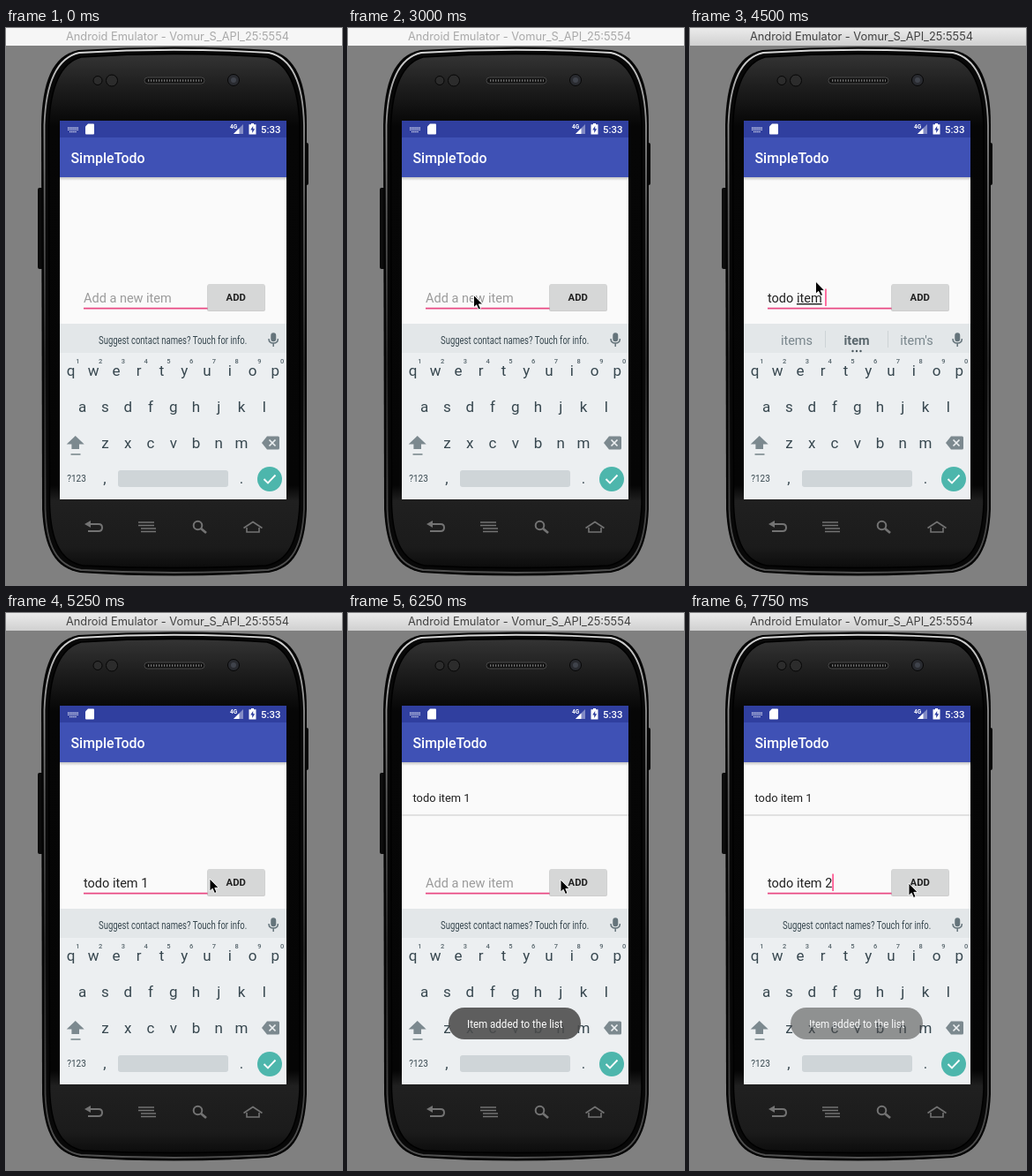
Write an HTML page that moves like this. It is 381x631 px and loops after 8000 ms.

```html
<!DOCTYPE html>
<html lang="en">
<head>
<meta charset="utf-8">
<title>Todo app demo</title>
<style>
  html, body { margin: 0; width: 100%; height: 100%; overflow: hidden; background: #808080; }
  svg { display: block; width: 381px; height: 631px; font-family: Roboto, sans-serif; }
  text { white-space: pre; }
  .mid { text-anchor: middle; }
  .medium { font-weight: 500; }
  #title { font: 12.8px Inter, sans-serif; }
  #keys { font-size: 17px; fill: #37474f; }
  #keys .hint { font-size: 7.5px; font-weight: 500; fill: #55646b; }
  #words { font-size: 14.5px; fill: #78858b; }
  #field { font-size: 14.5px; fill: #212121; }
  .composing { text-decoration: underline; text-decoration-thickness: 1px; }
</style>
</head>
<body>
<svg viewBox="0 0 381 631">
  <defs>
    <linearGradient id="bar" x2="0" y2="1">
      <stop stop-color="#ebebeb"/><stop offset="1" stop-color="#d0d0d0"/>
    </linearGradient>
    <linearGradient id="rim" x2="0" y2="1">
      <stop stop-color="#d8d8d8"/><stop offset=".08" stop-color="#a2a2a2"/>
      <stop offset=".3" stop-color="#5a5a5a"/><stop offset=".6" stop-color="#242424"/>
      <stop offset="1" stop-color="#505050"/>
    </linearGradient>
    <linearGradient id="face" x2="0" y2="1">
      <stop stop-color="#343434"/><stop offset=".06" stop-color="#1f1f1f"/>
      <stop offset=".14" stop-color="#060606"/><stop offset=".84" stop-color="#050505"/>
      <stop offset=".87" stop-color="#202020"/><stop offset=".96" stop-color="#1b1b1b"/>
      <stop offset="1" stop-color="#0c0c0c"/>
    </linearGradient>
    <linearGradient id="shade" x2="0" y2="1">
      <stop stop-opacity=".22"/><stop offset="1" stop-opacity="0"/>
    </linearGradient>
  </defs>

  <rect width="381" height="631" fill="#808080"/>
  <rect id="titleBar" width="381" height="20"/>
  <text id="title" class="mid" x="194.5" y="14">Android Emulator - Vomur_S_API_25:5554</text>

  <!-- phone -->
  <rect x="36" y="181" width="8" height="92" rx="2" fill="#0c0c0c"/>
  <rect x="337" y="130" width="6" height="48" rx="2" fill="#0c0c0c"/>
  <path d="M40 110C41 62 52 31 82 25Q190 18 299 25C329 31 341 62 341 110V545C339 590 326 612 298 617Q190 624 84 617C56 612 43 590 41 545Z" fill="#050505"/>
  <path d="M43.500 110C45 64 56 34 83 28Q190 21.500 298 28C325 34 337 64 338 110V545C336 588 324 609 297 614Q190 620 85 614C58 609 46 588 44.500 545Z" fill="#080808" stroke="url(#rim)" stroke-width="1.800"/>
  <path d="M48.500 112C50 70 60 40 85 33Q190 26 296 33C321 40 332 70 333 112V540C331 582 320 604 295 609Q190 614 87 609C62 604 51 582 49.500 540Z" fill="url(#face)" stroke="#000" stroke-width="1.500"/>
  <g stroke="#060606">
    <circle cx="104" cy="59.500" r="5" fill="#2c2c2c"/>
    <circle cx="120" cy="59.500" r="6.500" fill="#2c2c2c"/>
    <circle cx="258" cy="59" r="6.500" fill="#292b30"/>
  </g>
  <circle cx="258" cy="59" r="3" fill="#3f434b"/>
  <rect x="157" y="56" width="68" height="7" rx="3.500" fill="#111" stroke="#4a4a4a"/>
  <path d="M161 59.500H222" stroke="#777" stroke-width="2.500" stroke-dasharray="1.300 1.700"/>
  <g fill="none" stroke="#737373" stroke-width="2">
    <path d="M96 562h9q4 0 4 4t-4 4h-12"/>
    <path d="M96 558v8l-7-4z" fill="#737373" stroke="none"/>
    <path d="M150 560h18M150 563.500h18M153 567h17M153 570.500h17" stroke-width="1.500"/>
    <circle cx="217.500" cy="563.500" r="4.800"/><path d="M221 567l6 5" stroke-width="2.800"/>
    <path d="M269.500 566.500L280 559.500l10.500 7M273 566v5h14v-5" stroke-width="1.600"/>
  </g>

  <!-- app -->
  <rect x="61" y="105" width="257" height="429" fill="#fafafa"/>
  <rect x="61" y="124" width="257" height="45" fill="#3f51b5"/>
  <rect x="61" y="105" width="257" height="19" fill="#303f9f"/>
  <rect x="61" y="169" width="257" height="4" fill="url(#shade)"/>
  <g fill="#fff">
    <path d="M70 113.200h12M70 115.400h12M72 117.600h8" stroke="#d5d9ee" stroke-width="1.400" stroke-dasharray="1.400 .7"/>
    <path d="M93 108.500h6q1 0 1 1v10q0 1-1 1h-8q-1 0-1-1v-8z"/>
    <text x="254" y="114" font-size="6.500" font-weight="700">4G</text>
    <path d="M269 109v11h-11z" opacity=".4"/><path d="M264.500 113.500v6.500h-6.500z"/>
    <path d="M278 108h3v1.300h2.500v11.200h-8v-11.200h2.500z"/>
    <path d="M280.200 111l-3 4.500h2v3.500l3-4.700h-2z" fill="#303f9f"/>
    <text class="medium" x="289" y="119" font-size="11.400">5:33</text>
    <text class="medium" x="73.500" y="153" font-size="15.900">SimpleTodo</text>
  </g>
  <g id="item">
    <text x="73.500" y="214" font-size="12.850" fill="#212121">todo item 1</text>
    <path d="M61 229h257" stroke="#d8d8d8" stroke-width="1.300"/>
  </g>
  <path d="M88 317.700H229" stroke="#e94a84" stroke-width="1.700"/>
  <text x="88" y="311" font-size="14.500" fill="#9b9b9b" id="placeholder">Add a new item</text>
  <text x="88" y="311" id="field"></text>
  <rect id="caret" y="295.500" width="1.500" height="19.500" fill="#ff4081"/>
  <rect x="228" y="291" width="66" height="30" rx="2" fill="#000" opacity=".18"/>
  <rect id="button" x="228.500" y="290" width="65" height="30" rx="2"/>
  <text class="mid" x="260.700" y="309" font-size="11.300" font-weight="600" fill="#212121">ADD</text>

  <!-- keyboard -->
  <rect x="61" y="335" width="257" height="199" fill="#eceff1"/>
  <rect x="61" y="335" width="257" height="33" fill="#e3e7e9"/>
  <text id="notice" transform="translate(105 358) scale(.74 1)" font-size="12.850" fill="#37474f">Suggest contact names? Touch for info.</text>
  <g id="words" class="mid">
    <text x="121" y="359"></text>
    <text x="189" y="359" font-weight="700" fill="#5a676d"></text>
    <text x="257" y="359"></text>
    <path d="M153.500 343v19M224.500 343v19" stroke="#cdd3d6"/>
    <path d="M184.500 366h0M189 366h0M193.500 366h0" stroke="#4d5a60" stroke-width="2.400" stroke-linecap="round"/>
  </g>
  <g fill="none" stroke="#65747b" stroke-width="1.500">
    <rect x="301" y="346" width="4.500" height="8.500" rx="2.200" fill="#65747b"/>
    <path d="M298 352q0 5 5.200 5t5.200-5M303.200 357v4"/>
  </g>
  <g id="keys" class="mid">
    <text x="80" y="514" font-size="10">?123</text>
    <text x="112" y="516">,</text><text x="267" y="516">.</text>
  </g>
  <rect x="127" y="501" width="125" height="19" rx="3" fill="#cfd5d8"/>
  <path d="M78.700 462l10 9.500h-5.700v5.500h-8.600v-5.500h-5.700z" fill="#7c898f"/>
  <path d="M73.500 483h11" stroke="#7c898f" stroke-width="1.600"/>
  <path d="M296 462.500h12.500q1.500 0 1.500 1.500v12q0 1.500-1.500 1.500H296l-6-7.500z" fill="#7c898f"/>
  <path d="M298.500 466.500l7 7m0-7l-7 7" stroke="#eceff1" stroke-width="1.700"/>
  <circle cx="299" cy="511" r="14" fill="#4db6ac"/>
  <path d="M292.500 511l4.500 4.500 8.500-9" fill="none" stroke="#fff" stroke-width="1.900"/>

  <g id="toast">
    <rect x="114" y="447" width="150" height="36" rx="18" fill="#4a4a4a" opacity=".88"/>
    <text transform="translate(135 470) scale(.9 1)" font-size="12.850" fill="#fff">Item added to the list</text>
  </g>
  <path id="mouse" d="M0 0V14.200L3.200 11.300 5.500 16.500 8 15.400 5.800 10.400H10.200Z" fill="#000" stroke="#fff" stroke-width=".9"/>
</svg>

<script>
const $ = id => document.getElementById(id);
const NS = "http://www.w3.org/2000/svg";
const LOOP = 8000;

function addText(parent, x, y, content, className = "") {
  const node = document.createElementNS(NS, "text");
  node.setAttribute("x", x);
  node.setAttribute("y", y);
  node.setAttribute("class", className);
  node.textContent = content;
  parent.append(node);
}

[["qwertyuiop", 73.5, 394], ["asdfghjkl", 86.7, 435], ["zxcvbnm", 112.5, 476]].forEach(([row, left, y], r) => {
  [...row].forEach((letter, i) => {
    const x = left + 25.75 * i;
    addText($("keys"), x, y, letter);
    if (r === 0) addText($("keys"), x + 8, 380, (i + 1) % 10, "hint");
  });
});

// Each step lists only what changes; underscores enclose composing text.
const steps = [
  [0, { active: false, text: "", caret: false, words: null, mouse: null, item: false, toast: 0, pressed: false }],
  [250, { caret: true }],
  [750, { caret: false, mouse: [161, 265] }],
  [1000, { mouse: [148, 290] }],
  [1250, { caret: true, mouse: [142.5, 302.5] }],
  [1750, { caret: false }],
  [2250, { caret: true }],
  [2750, { caret: false }],
  [3250, { active: true, caret: true, mouse: [142.5, 295] }],
  [3500, { text: "t", mouse: [142.5, 287] }],
  [3750, { text: "tod", words: ["go", "to", "two"] }],
  [4000, { text: "todo ", words: ["to do", "todo", "today"] }],
  [4250, { text: "todo _it_", words: ["its", "it", "it's"] }],
  [4500, { text: "todo _item_ ", words: ["items", "item", "item's"] }],
  [4750, { text: "todo item 1", words: null, mouse: [180, 294] }],
  [5000, { mouse: [231, 301] }],
  [5250, { caret: false }],
  [5500, { pressed: true, mouse: [241, 302] }],
  [5750, { text: "", caret: true, item: true, toast: .63 }],
  [6000, { toast: 1, pressed: false }],
  [6250, { caret: false }],
  [6750, { text: "t", caret: true }],
  [7000, { text: "todo ", words: ["to do", "todo", "today"] }],
  [7250, { text: "todo _item_ ", words: ["items", "item", "item's"] }],
  [7500, { text: "todo item 2", words: null }],
  [7750, { toast: .65, mouse: [248, 306] }]
];

const show = (id, on) => { $(id).style.display = on ? "" : "none"; };

function setField(text) {
  $("field").replaceChildren(...text.split("_").map((part, i) => {
    const span = document.createElementNS(NS, "tspan");
    span.textContent = part;
    if (i % 2) span.setAttribute("class", "composing");
    return span;
  }));
}

function render(state) {
  $("titleBar").setAttribute("fill", state.active ? "url(#bar)" : "#f6f6f6");
  $("title").setAttribute("fill", state.active ? "#414141" : "#a9a9a9");
  $("button").setAttribute("fill", state.pressed ? "#cbcccc" : "#d6d7d7");
  setField(state.text);
  show("placeholder", !state.text);
  show("item", state.item);
  show("caret", state.caret);
  $("caret").setAttribute("x", 88 + (state.text && $("field").getComputedTextLength()));
  show("notice", !state.words);
  show("words", state.words);
  if (state.words) $("words").querySelectorAll("text").forEach((t, i) => { t.textContent = state.words[i]; });
  $("toast").style.opacity = state.toast;
  show("mouse", state.mouse);
  if (state.mouse) $("mouse").setAttribute("transform", `translate(${state.mouse})`);
}

let shown = -1;
function tick() {
  const time = performance.now() % LOOP;
  const current = steps.filter(([start]) => start <= time);
  if (current.length !== shown) {
    shown = current.length;
    render(Object.assign({}, ...current.map(([, change]) => change)));
  }
  requestAnimationFrame(tick);
}
tick();
</script>
</body>
</html>
```
